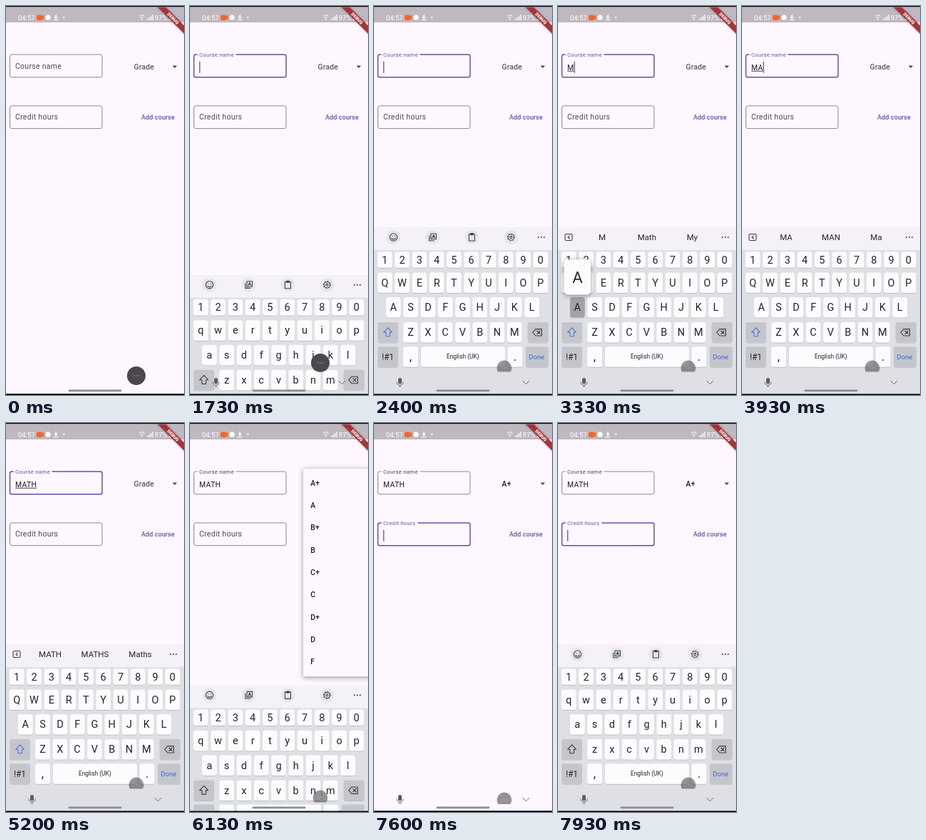
These frames come from a looping animation (250 by 545 pixels, 8 s). An HTML page:

```html
<!DOCTYPE html>
<html lang="en">
<head>
<meta charset="utf-8">
<title>Course form</title>
<style>
html, body { margin: 0; width: 100%; height: 100%; overflow: hidden; background: #000; }
svg { display: block; width: 250px; height: 545px; font-family: Roboto, "Open Sans", sans-serif; }
text { white-space: pre; }
.mid { text-anchor: middle; }
.form { font-size: 10.4px; letter-spacing: .33px; }
.menu text, .grade { font-size: 10.4px; font-weight: 500; fill: #1d1b20; letter-spacing: .13px; }
.line { fill: none; stroke: #3c3c42; stroke-width: 1.1; stroke-linecap: round; stroke-linejoin: round; }
.dim { stroke: #66666c; stroke-width: 1; }
.key { fill: #fcfcfe; }
.fn { fill: #c5c6cb; }
.glyph { font-size: 14.5px; fill: #242427; text-anchor: middle; }
.word { font-size: 11.5px; fill: #242427; text-anchor: middle; }
</style>
</head>
<body>
<svg viewBox="0 0 250 545">
  <defs>
    <clipPath id="screen"><rect y="1.6" width="250" height="541.7"/></clipPath>
    <clipPath id="reveal"><rect id="revealBox" x="130" y="44" width="120" height="330"/></clipPath>
    <clipPath id="dock"><rect id="dockBox" width="250" height="545"/></clipPath>
    <filter id="lift" x="-30%" y="-30%" width="160%" height="160%">
      <feDropShadow dx="0" dy="1.5" stdDeviation="3.8" flood-color="#000" flood-opacity=".42"/>
    </filter>
    <filter id="soft" x="-10%" y="-10%" width="120%" height="130%">
      <feDropShadow dx="0" dy=".8" stdDeviation=".5" flood-color="#000" flood-opacity=".2"/>
    </filter>
    <filter id="fold" x="-30%" y="-30%" width="160%" height="160%">
      <feDropShadow dx="0" dy="0" stdDeviation="1.6" flood-color="#000" flood-opacity=".5"/>
    </filter>
  </defs>
  <g clip-path="url(#screen)">
    <rect width="250" height="545" fill="#fef7ff"/>
    <g id="fields"></g>
    <text id="grade" class="grade" x="179.6" y="88.5">Grade</text>
    <path d="M233.7 83.6h6.6l-3.3 3.3z" fill="#49454f"/>
    <text x="190" y="159" font-size="9.1" font-weight="500" fill="#6750a4" letter-spacing=".06">Add course</text>

    <g id="menu" class="menu" clip-path="url(#reveal)">
      <rect x="159" y="64" width="96" height="291" rx="1.5" fill="#fef7ff" filter="url(#lift)"/>
    </g>

    <g id="board">
      <rect y="310.7" width="250" height="300" fill="#dfe0e5"/>
      <rect y="310.7" width="250" height="31.3" fill="#f4f2f8"/>
      <g id="tools" transform="translate(.4 0)">
        <g fill="#e7e6ec">
          <circle cx="27" cy="324" r="10"/><circle cx="82" cy="324" r="10"/>
          <circle cx="137" cy="324" r="10"/><circle cx="192" cy="324" r="10"/>
        </g>
        <g class="line">
          <circle cx="27" cy="324" r="5.2"/>
          <path d="M24.3 325.3q2.7 3.4 5.4 0M25.2 322.3v.3M28.8 322.3v.3"/>
          <path d="M79.5 319h7.5v7.5h-7.500zM77.3 322v6.700h6.800M81.500 324.800l1.800-4 1.800 4M82.200 323.600h2.200"/>
          <path d="M133 319.500h8v9.500h-8zM135.300 318.600h3.400v2h-3.400z"/>
          <circle cx="192" cy="324" r="4.2"/><circle cx="192" cy="324" r="1.6"/>
          <circle cx="192" cy="324" r="5.1" stroke-dasharray="1.2 2.8" stroke-linecap="butt"/>
        </g>
      </g>
      <g id="words">
        <path class="line" d="M11.5 319.5h7a1.5 1.5 0 0 1 1.5 1.5v6a1.5 1.5 0 0 1-1.5 1.5h-7a1.5 1.5 0 0 1-1.5-1.5v-6a1.5 1.5 0 0 1 1.5-1.5zM16.2 321.8l-2.2 2.2 2.2 2.2"/>
        <g id="cells"></g>
      </g>
      <g fill="#3c3c42"><circle cx="231" cy="324" r="1"/><circle cx="235" cy="324" r="1"/><circle cx="239" cy="324" r="1"/></g>
      <g id="keys" filter="url(#soft)"></g>
      <g id="caps"></g>
      <path id="shift" class="line" d="M19.500 450.800l6 6.500h-3.200v5.500h-5.600v-5.500h-3.200z"/>
      <path class="line" d="M227 452.600h8.500v9.400h-8.500l-4-4.700zM229 455l4.400 4.400M233.400 455l-4.400 4.400"/>
      <g id="popup">
        <rect x="-18.5" y="-25" width="37" height="49" rx="5" fill="#fcfcfe" filter="url(#lift)"/>
        <text id="popText" class="mid" y="7.5" font-size="22" fill="#242427"></text>
      </g>
    </g>

    <g clip-path="url(#dock)">
      <g id="ball">
        <circle r="13" fill="#4b474d"/>
        <path d="M-4.500 0h2M-1 0h2M2.500 0h2" stroke="#a9a5aa" stroke-width=".8"/>
      </g>
    </g>

    <g id="nav">
      <rect x="34" y="521" width="5" height="8.5" rx="2.5" fill="#5c5c62"/>
      <path class="line dim" d="M32 527a4.5 4.5 0 0 0 9 0M36.5 531.8v2.200"/>
      <path class="line dim" d="M209 525.3l4.5 4.5 4.5-4.5"/>
    </g>
    <rect x="87.5" y="537.4" width="75" height="2.8" rx="1.4" fill="#8e8b91"/>

    <rect width="250" height="23" fill="#bfb9bf"/>
    <g fill="#fff">
      <text x="17" y="19.500" font-size="9.500">04:57</text>
      <path d="M44.5 12.5h5a1.5 1.5 0 0 1 1.5 1.5l2.4-1.4v7l-2.400-1.400a1.500 1.800 0 0 1-1.500 1.800h-5a1.500 1.500 0 0 1-1.500-1.500v-4.500a1.500 1.500 0 0 1 1.500-1.500z" fill="#f2672e"/>
      <circle cx="59" cy="16" r="3.6"/>
      <path d="M69.3 12h1.6v3.3h1.9l-2.7 2.8-2.7-2.8h1.9zM67 18.8h6.2v1.2H67z"/>
      <circle cx="81.3" cy="16" r="1.2"/>
      <path d="M187 14.5q4-3.600 8 0M188.700 16.500q2.300-2 4.600 0" fill="none" stroke="#fff"/>
      <circle cx="191" cy="18.6" r="1"/>
      <path d="M198.500 17.500h1.300V20h-1.300zM200.800 15.800h1.300V20h-1.300zM203.100 14h1.300v6h-1.300zM205.400 12h1.300v8h-1.300z"/>
      <text x="208.800" y="19.500" font-size="9.600">97%</text>
      <rect x="229" y="11.8" width="5" height="8.4" rx="1"/>
    </g>
    <g filter="url(#fold)">
      <path d="M205 -6.500h11L256 33.500v11z" fill="#a3343a"/>
    </g>
    <text class="mid" transform="translate(234.800 17.300) rotate(45)" y="2.300" font-size="6.300" font-weight="900" fill="#fff">DEBUG</text>
  </g>
</svg>
<script>
const LOOP = 8000;
const $ = id => document.getElementById(id);

function add(parent, tag, attrs = {}, text = '') {
  const el = document.createElementNS('http://www.w3.org/2000/svg', tag);
  for (const k in attrs) el.setAttribute(k, attrs[k]);
  el.textContent = text;
  parent.appendChild(el);
  return el;
}
const set = (el, attrs) => { for (const k in attrs) el.setAttribute(k, attrs[k]); };
const show = (el, on) => el.setAttribute('visibility', on ? 'visible' : 'hidden');
const within = (t, a, b) => t >= a && t < b;
const ramp = (t, a, b) => Math.min(1, Math.max(0, (t - a) / (b - a)));
const ease = p => 1 - (1 - p) ** 3;

// Latest entry of [[time, ...], ...] at or before t
const latest = (list, t) => list.filter(e => e[0] <= t).pop();

function tween(list, t) {
  const i = list.findIndex(e => e[0] > t);
  if (i < 0) return list[list.length - 1][1];
  if (i === 0) return list[0][1];
  const [a, b] = [list[i - 1], list[i]];
  return a[1] + (b[1] - a[1]) * (t - a[0]) / (b[0] - a[0]);
}

function makeField(name, y, gap) {
  const g = add($('fields'), 'g', { transform: `translate(0 ${y})` });
  const box = add(g, 'rect', { x: 5.5, y: .5, width: 129.5, height: 31.8, rx: 2.6, fill: 'none' });
  const notch = add(g, 'rect', { y: -2, height: 5, fill: '#fef7ff' });
  const label = add(g, 'text', { class: 'form' }, name);
  const value = add(g, 'text', { class: 'form', x: 13, y: 22, fill: '#1d1b20' });
  const under = add(g, 'rect', { x: 13, y: 23.3, height: .8, fill: '#1d1b20' });
  const caret = add(g, 'rect', { y: 10.3, width: 1.3, height: 16, fill: '#6750a4' });
  return (lift, focus, text, blink, composing) => {
    const color = focus ? '#6750a4' : '#49454f';
    set(box, { stroke: focus ? '#6750a4' : '#7f7a83', 'stroke-width': focus ? 1.5 : .9 });
    set(notch, { x: 10.5 + gap / 2 * (1 - lift), width: gap * lift });
    set(label, { fill: color, transform: `translate(13 ${20 - 16.6 * lift}) scale(${1 - .25 * lift})` });
    value.textContent = text;
    const w = text ? value.getComputedTextLength() : 0;
    set(under, { width: w });
    set(caret, { x: 13 + w });
    show(under, composing && text);
    show(caret, focus && blink);
  };
}
const course = makeField('Course name', 67.5, 54);
const credit = makeField('Credit hours', 139.4, 51);

['A+', 'A', 'B+', 'B', 'C+', 'C', 'D+', 'D', 'F'].forEach((g, i) =>
  add($('menu'), 'text', { x: 169.3, y: 87.7 + i * 31.3 }, g));

// Keyboard
const PITCH = 24.3, keyMap = {};
function addKey(x, y, w, h, fn) {
  return add($('keys'), 'rect', { x: x - w / 2, y: y - h / 2, width: w, height: h, rx: 3.5, class: fn ? 'fn' : 'key' });
}
function addRow(chars, x0, y, h) {
  [...chars].forEach((c, i) => {
    const x = x0 + i * PITCH;
    const key = addKey(x, y, 20.8, h);
    const text = add($('caps'), 'text', { class: 'glyph', x, y: y + 5 }, c);
    keyMap[c] = { x, y, key, text };
  });
}
addRow('1234567890', 15.2, 355.5, 22.5);
addRow('qwertyuiop', 15.2, 387.7, 28.5);
addRow('asdfghjkl', 27.3, 422.3, 28.5);
addRow('zxcvbnm', 51.5, 457.3, 28.5);
addKey(19.5, 457.3, 29, 28.5, true);
addKey(230.3, 457.3, 29, 28.5, true);
addKey(19.5, 491.5, 29, 28.5, true);
addKey(51.5, 491.5, 20.8, 28.5);
addKey(125, 491.5, 118, 28.5);
addKey(198, 491.5, 20.8, 28.5);
addKey(229, 491.5, 32, 28.5, true);
[[19.5, '!#1', 12, '#242427'], [51.5, ',', 17, '#242427'], [124.8, 'English (UK)', 8.4, '#242427'],
 [198, '.', 17, '#242427'], [228.3, 'Done', 9.6, '#3f68d8']].forEach(([x, s, size, fill]) =>
  add($('caps'), 'text', { class: 'mid', x, y: 491.5 + size * .35, 'font-size': size, fill }, s));

const cells = [62, 125, 188.5].map(x => {
  const text = add($('cells'), 'text', { class: 'word', x, y: 328.2 });
  return [add(text, 'tspan'), add(text, 'tspan')];
});

// Timeline
const typed = [[0, ''], [2870, 'M'], [3470, 'MA'], [4270, 'MAT'], [4670, 'MATH']];
const presses = [[2730, 2870, 'm'], [3270, 3470, 'a'], [4130, 4270, 't'], [4540, 4670, 'h']];
const hints = [
  [0, ['', '', '']], [2930, ['M', 'Math', 'My']], [3600, ['MA', 'MAN', 'Ma']],
  [4400, ['MAT', 'MATH', 'MaTE']], [4600, ['MAT', 'MATH', 'MATE']], [4800, ['MATH', 'MATHS', 'Maths']]
];
const slide = [
  [1729, 240], [1730, 67.3], [1800, 24], [1870, 7], [1970, 0],
  [6000, 0], [6060, 14], [6130, 56.3], [6200, 130], [6290, 240],
  [7669, 240], [7670, 67], [7730, 26], [7800, 8], [7930, 0]
];
const bubbleY = [
  [1690, 518], [1730, 500], [2200, 500], [2400, 507], [6000, 507],
  [6130, 525], [6290, 528], [7660, 528], [7730, 514], [7930, 507]
];
const bubbleCut = [[2399, 545], [2400, 512.5], [6000, 512.5], [6130, 531.5], [6290, 534], [7660, 534], [7730, 520], [7930, 512.5]];

function drawHints(t) {
  const i = hints.indexOf(latest(hints, t));
  const [start, row] = hints[i], prev = i ? hints[i - 1][1] : row;
  cells.forEach(([head, tail], c) => {
    let n = 0;
    while (n < row[c].length && row[c][n] === prev[c][n]) n++;
    head.textContent = row[c].slice(0, n);
    tail.textContent = row[c].slice(n);
    set(tail, { 'fill-opacity': c ? ramp(t, start, start + 170) : 1 });
  });
}

function drawKeys(t, up) {
  const caps = within(t, 2270, 6000), press = presses.find(p => within(t, p[0], p[1]));
  for (const c in keyMap) {
    const { key, text } = keyMap[c];
    text.textContent = caps ? c.toUpperCase() : c;
    key.style.fill = press && press[2] === c ? '#a3a3a7' : '';
  }
  $('shift').style.stroke = caps ? '#4a72dc' : '';
  show($('popup'), up && press);
  if (press) {
    const { x, y } = keyMap[press[2]];
    set($('popup'), { transform: `translate(${x} ${y - 42})` });
    $('popText').textContent = press[2].toUpperCase();
  }
}

function draw(t) {
  const [since, text] = latest(typed, t);
  const blink = (t - Math.max(since, 1400)) % 1000 < 520;
  const editing = within(t, 1330, 5940);
  course(ease(ramp(t, 1330, 1510)), editing, text, blink, editing);
  credit(ease(ramp(t, 7450, 7590)), t >= 7470, '', true, false);

  const chosen = t >= 6930;
  $('grade').textContent = chosen ? 'A+' : 'Grade';
  $('grade').style.fill = chosen ? '#1d1b20' : '#5c5761';

  show($('menu'), within(t, 5930, 6930));
  set($('menu'), { opacity: ramp(t, 5910, 6010) });
  set($('revealBox'), { height: 50 + 280 * ease(ramp(t, 5930, 6120)) });

  const drop = tween(slide, t), up = drop < 236;
  show($('board'), up);
  set($('board'), { transform: `translate(0 ${drop})` });
  const wording = within(t, 2930, 5980);
  $('words').style.display = wording ? '' : 'none';
  $('tools').style.display = wording ? 'none' : '';
  drawHints(t);
  drawKeys(t, up);

  const idle = ramp(t, 2200, 2400);
  set($('ball'), { transform: `translate(183 ${tween(bubbleY, t)}) scale(${1 - .2 * idle})`, opacity: 1 - .42 * idle });
  set($('dockBox'), { height: tween(bubbleCut, t) });
  show($('nav'), within(t, 1530, 6000) || t >= 7590);
}

function frame(now) {
  draw(now % LOOP);
  requestAnimationFrame(frame);
}
draw(0);
requestAnimationFrame(frame);
</script>
</body>
</html>
```
